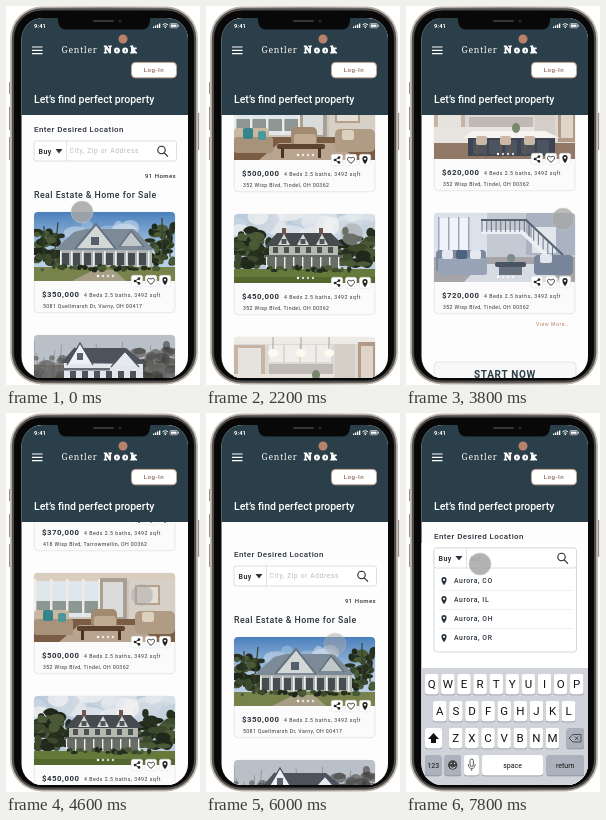
Animation, 194 px wide and 379 px high, one loop 8 s. Source, as an HTML page:

```html
<!DOCTYPE html>
<html lang="en">
<head>
<meta charset="utf-8">
<title>Property search</title>
<style>
  html, body { margin: 0; width: 100%; height: 100%; overflow: hidden; background: #fff; }
  svg { display: block; width: 100vw; height: 100vh; font-family: Roboto, sans-serif; }
</style>
</head>
<body>
<svg id="stage" viewBox="0 0 194 379"></svg>
<script>
const TEAL = '#2a3f49', PEACH = '#b9826b', INK = '#2b333c';
const LOOP = 8000, STEP = 200;

// Drawing helpers
const rect = (x, y, w, h, fill, rx = 0, extra = '') =>
  `<rect x="${x}" y="${y}" width="${w}" height="${h}" rx="${rx}" fill="${fill}" ${extra}/>`;
const shape = (d, fill, extra = '') => `<path d="${d}" fill="${fill}" ${extra}/>`;
const line = (d, color, w = 1, extra = '') =>
  `<path d="${d}" fill="none" stroke="${color}" stroke-width="${w}" ${extra}/>`;
const oval = (x, y, rx, ry, fill, extra = '') =>
  `<ellipse cx="${x}" cy="${y}" rx="${rx}" ry="${ry}" fill="${fill}" ${extra}/>`;
const text = (s, x, y, size, fill = INK, spacing = 0, weight = 400, extra = '') =>
  `<text x="${x}" y="${y}" font-size="${size}" fill="${fill}" letter-spacing="${spacing}" font-weight="${weight}" ${extra}>${s}</text>`;
const at = (x, y, content, id = '') => `<g ${id && `id="${id}"`} transform="translate(${x} ${y})">${content}</g>`;
const many = (n, fn) => Array.from({ length: n }, (_, i) => fn(i)).join('');

function randomizer(seed) {
  return () => (seed = (seed * 16807) % 2147483647) / 2147483647;
}

function blobs(seed, n, x, y, w, h, size, colors, opacity = 1) {
  const rnd = randomizer(seed * 7919);
  return many(n, i => oval((x + rnd() * w).toFixed(1), (y + rnd() * h).toFixed(1),
    (size * (.6 + rnd())).toFixed(1), (size * (.5 + rnd() * .6)).toFixed(1),
    colors[i % colors.length], `opacity="${opacity}"`));
}

const panes = (x, y, n, gap, w, h, fill) => many(n, i => rect(x + i * gap, y, w, h, fill));
const leaves = ['#26301f', '#3b4a2c', '#1f281b', '#4a5936'];

// Photos, each 141 x 69
const photos = [
  () => rect(0, 0, 141, 69, 'url(#sky)') +
    blobs(11, 8, 30, 14, 80, 12, 8, ['#d8e4ef', '#a9c7e5'], .5) +
    blobs(5, 45, 0, 20, 28, 32, 4, leaves) +
    blobs(8, 45, 112, 14, 28, 38, 4, leaves) +
    line('M10 50V14M20 50L24 10M128 45V6M136 45V14', '#37402b', 1.2) +
    rect(26, 36, 92, 20, '#aeb3b2') + panes(28, 41, 8, 11, 7, 12, '#444d50') +
    shape('M20 38L40 20L52 17H100L120 38Z', '#7d8b98') +
    shape('M42 36L62 13L80 36Z', '#d3d7d6') + line('M41 37L62 12L82 37', '#66727d', 2) +
    shape('M86 34L97 20L109 34Z', '#c2c8ca') + line('M85 35L97 19L110 35', '#66727d', 1.5) +
    rect(57, 25, 8, 8, '#53606a') + panes(26, 39, 9, 11, 1.5, 17, '#eceeec') +
    rect(0, 55, 141, 14, '#77834a') + shape('M38 69L60 58H80L92 69Z', '#a69f86') +
    blobs(21, 36, 5, 54, 130, 4, 2.6, leaves),

  () => rect(0, 0, 141, 69, '#b9c0c8') + rect(0, 30, 141, 22, '#6f7071') +
    blobs(9, 40, 100, 10, 41, 36, 5, ['#4d4b48', '#65625e', '#3b3c3a'], .6) +
    blobs(3, 24, 0, 22, 30, 22, 4, ['#6c6a68', '#54544f'], .6) +
    many(24, i => line(`M${i * 6} 48L${i * 6 + Math.sin(i * 5) * 4} ${6 + 16 * Math.abs(Math.sin(i * 2.3))}`, '#55524f', .6, 'opacity=".6"')) +
    rect(30, 27, 79, 24, '#e3e6eb') +
    shape('M27 28L40 13H92L112 29Z', '#4c535d') +
    shape('M34 29L46 9L58 29Z', '#eef0f4') + line('M33 30L46 8L59 30', '#4d555f', 1.3) +
    shape('M78 31L91 17L104 31Z', '#e6e9ee') + line('M77 32L91 16L105 32', '#4d555f', 1.3) +
    panes(36, 36, 6, 12, 6, 10, '#4c535c') + rect(43, 18, 6, 7, '#59636e') +
    rect(28, 33, 48, 2.5, '#646c76') +
    rect(0, 49, 141, 20, '#e6eaf0') + shape('M30 69Q60 54 112 56L141 64V69Z', '#b3bac4') +
    blobs(4, 12, 25, 49, 88, 2, 2, ['#3f413f', '#65655f'], .8),

  () => rect(0, 0, 141, 69, '#cfc6bb') + rect(0, 0, 141, 8, '#d8cdbf') +
    rect(2, 8, 62, 36, '#dfe7ec') + rect(2, 28, 62, 12, '#8c9692') +
    panes(0, 6, 5, 16, 2.4, 38, '#efebe5') +
    rect(66, 5, 27, 42, '#a9a093') + rect(69, 9, 20, 35, '#d9dcda') +
    rect(95, 6, 46, 40, '#d7d0c7') + rect(101, 12, 25, 20, '#b6a08b') + rect(103, 14, 21, 16, '#e4ded4') +
    rect(0, 46, 141, 23, '#7b5c45') + shape('M25 69L45 52H103L123 69Z', '#b9a58f') +
    rect(0, 37, 35, 18, '#c9b79f', 4) + rect(0, 46, 39, 16, '#a8937a', 3) +
    rect(9, 37, 10, 11, '#35858c', 2) + rect(24, 40, 8, 9, '#4b979b', 2) +
    rect(57, 36, 26, 19, '#a28a71', 5) + rect(60, 43, 22, 11, '#c0ab92', 3) +
    rect(101, 38, 40, 23, '#b09b84', 5) + rect(108, 39, 12, 10, '#dcd0bf', 2) +
    rect(43, 53, 48, 5, '#5c4231', 2) + panes(47, 57, 2, 37, 3, 10, '#4b3426'),

  () => rect(0, 0, 141, 69, '#b9cbdd') +
    blobs(31, 30, 0, 0, 141, 20, 10, ['#e5e9ec', '#cbd6e0', '#f0f1f0'], .75) +
    blobs(17, 70, 0, 27, 141, 22, 5, leaves) +
    blobs(41, 40, 0, 16, 26, 36, 5, leaves) + blobs(43, 40, 108, 17, 33, 34, 5, leaves) +
    rect(35, 29, 69, 27, '#b7b9b1') + shape('M31 32L43 19H97L110 32Z', '#454b4e') +
    rect(48, 14, 4, 7, '#6f5750') + rect(85, 14, 4, 7, '#6f5750') +
    many(3, i => at(45 + i * 19, 21, shape('M-1 10L5 -1L11 10Z', '#d9dad5') + rect(2.5, 4, 5, 5, '#4d5758'))) +
    panes(39, 33, 6, 11, 5, 6, '#4a5351') + rect(30, 41, 79, 3, '#626866') +
    rect(34, 44, 71, 11, '#686e66') + panes(32, 43, 9, 9, 1.4, 13, '#eeeee8') +
    rect(0, 55, 141, 14, '#65793a') + rect(0, 63, 141, 6, '#53672f') +
    blobs(2, 28, 23, 53, 95, 4, 2.5, leaves),

  () => rect(0, 0, 141, 69, '#dcd8d4') + rect(0, 0, 141, 7, '#eeeae5') +
    rect(0, 8, 31, 30, '#c6b5a5') + rect(4, 11, 23, 26, '#e6e3df') +
    panes(35, 8, 4, 16, 14, 17, '#f0eeeb') + rect(35, 27, 64, 10, '#bfbab5') +
    rect(101, 7, 20, 42, '#d5cec6') + rect(124, 5, 17, 47, '#b29a86') + rect(127, 9, 12, 39, '#dfd4c9') +
    many(3, i => line(`M${39 + i * 28} 0V13`, '#8a8580', .7) + oval(39 + i * 28, 16, 5, 4, '#fffaf0')) +
    rect(0, 37, 100, 16, '#e7e4e0') +
    rect(0, 53, 141, 16, '#927867') + shape('M38 41H111L126 48H29Z', '#f6f4f1') +
    rect(34, 48, 87, 18, '#3d4553') + panes(39, 50, 5, 16, 12, 14, '#4d5461') +
    many(3, i => at(42 + i * 24, 46, rect(0, 0, 11, 9, '#cbb9a6', 2) + line('M1 9V21M10 9V21', '#705442', 1.3))) +
    oval(82, 38, 4, 5, '#78866b'),

  () => rect(0, 0, 141, 69, '#c4cad4') + rect(0, 0, 53, 44, '#dce2eb') +
    rect(5, 5, 30, 32, '#eff4fa') + panes(4, 4, 4, 10, 1.5, 34, '#9ca8b9') +
    rect(92, 0, 49, 42, '#aab3c1') + rect(98, 14, 24, 26, '#e1e6ec') +
    line('M47 7H92L129 42', '#5b6473', 2.2) + line('M47 19H88L121 50', '#eceff4', 4) +
    many(16, i => line(`M${48 + i * 4.7} ${7 + Math.max(0, i - 9) * 4.4}v12`, '#515c6d', .8)) +
    rect(0, 44, 141, 25, '#a8a5a9') + shape('M30 69L47 51H110L127 69Z', '#d7dbe3') +
    rect(2, 37, 50, 22, '#7c899e', 4) + rect(4, 45, 49, 17, '#98a4b6', 3) +
    many(3, i => rect(8 + i * 14, 37, 11, 9, i % 2 ? '#4e6381' : '#e5e9ef', 2)) +
    rect(100, 42, 39, 20, '#78859a', 4) + rect(106, 41, 12, 9, '#e1e6ec', 2) +
    rect(61, 49, 31, 5, '#495463', 2) + rect(65, 54, 23, 8, '#68717e') + oval(77, 45, 4, 4, '#7d8f86')
];

const pin = (color, hole) =>
  shape('M0 4.2C-4 -.5 -2.8 -4 0 -4S4 -.5 0 4.2Z', color) + oval(0, -1.2, 1.1, 1.1, hole);
const icons = [
  line('M2 -2.4L-2 0L2 2.4', '#222', .9) + oval(2, -2.4, 1.3, 1.3, '#222') + oval(-2, 0, 1.3, 1.3, '#222') + oval(2, 2.4, 1.3, 1.3, '#222'),
  line('M0 3.3C-6 -.5 -3 -4.6 0 -1.8C3 -4.6 6 -.5 0 3.3Z', '#222', .9),
  pin('#222', '#fff')
];

const homes = [
  ['$350,000', '5081 Quellmarsh Dr, Varny, OH 00417'],
  ['$370,000', '418 Wisp Blvd, Tarrowmellin, OH 00362'],
  ['$500,000', '352 Wisp Blvd, Tindel, OH 00362'],
  ['$450,000', '352 Wisp Blvd, Tindel, OH 00362'],
  ['$620,000', '352 Wisp Blvd, Tindel, OH 00362'],
  ['$720,000', '352 Wisp Blvd, Tindel, OH 00362']
];

const card = ([price, address], i) => at(28, 206 + i * 123,
  rect(.2, .2, 140.8, 100.6, '#fbfbfb', 4, 'stroke="#dedfe1" stroke-width=".7"') +
  `<g clip-path="url(#photo)">${photos[i]()}</g>` +
  many(4, k => oval(64 + k * 5, 64, 1.2, 1.2, '#fff', `opacity="${k ? .75 : 1}"`)) +
  icons.map((icon, k) => at(103 + k * 14, 69,
    rect(-5.7, -5.7, 11.4, 11.4, '#fff', 2, 'stroke="#ddd" stroke-width=".5"') + icon)).join('') +
  text(price, 8, 85, 7.8, INK, .55, 700) +
  text('4 Beds 2.5 baths, 3492 sqft', 50, 85, 5.2, '#333', .52) +
  text(address, 9, 96, 5.2, '#333', .38));

const searchBar = query =>
  rect(28, 135, 142.5, 20, '#fff', 2.5, 'stroke="#d5d6d9" stroke-width=".8"') +
  text('Buy', 32.5, 147.5, 7, INK, .45, 700) + shape('M49.5 143H56.5L53 147.5Z', INK) +
  line('M60.5 135V155', '#d5d6d9', .7) + query +
  '<circle cx="155.5" cy="144" r="3.7" fill="none" stroke="#222" stroke-width="1.1"/>' +
  line('M158.2 146.8L162 150.6', '#222', 1.2);

const page = text('Enter Desired Location', 28, 126, 8, INK, .4, 500) +
  searchBar(text('City, Zip or Address', 63.5, 147, 6.6, '#b9bbc0', .65)) +
  text('91 Homes', 139, 172, 6, INK, .45, 500) +
  text('Real Estate &amp; Home for Sale', 28, 192, 8.8, INK, .45, 500) +
  homes.map(card).join('') +
  text('View More...', 130, 934, 5.2, PEACH, .5) +
  rect(28, 970, 142, 50, '#f8f8f9', 4, 'stroke="#d9dadd" stroke-width=".7"') +
  text('START NOW', 68, 986, 10, TEAL, .7, 700);

const dropdown = rect(15, 130, 167, 242, '#fff') +
  rect(28, 135, 142.5, 104, '#fff', 3, 'stroke="#d3d4d8" stroke-width=".9"') +
  searchBar('<text id="query" x="63.5" y="147.5" font-size="6.8" letter-spacing=".6" fill="#888"></text>') +
  ['CO', 'IL', 'OH', 'OR'].map((state, i) => at(0, i * 19,
    at(38, 168, pin(INK, '#fff')) + text('Aurora, ' + state, 48, 170, 6.8, INK, .6, 500) +
    (i < 3 ? line('M32 177.5H167', '#e6e6e8', .6) : ''))).join('');

const GREY = '#acb2bd';
const key = (x, y, w, label = '', fill = '#fff', size = 11.5) =>
  rect(x, y + .8, w, 20.5, '#898d93', 2.4) + rect(x, y, w, 20.5, fill, 2.4) +
  text(label, x + w / 2, y + 10.2 + size * .36, size, '#111', 0, 400, 'text-anchor="middle"');
const keyRow = (letters, x, y) => [...letters].map((c, i) => key(x + i * 16.1, y, 13.6, c)).join('');
const keyboard = rect(15, 255, 167, 120, '#d0d3da') +
  keyRow('QWERTYUIOP', 19, 261) + keyRow('ASDFGHJKL', 27, 288) + keyRow('ZXCVBNM', 43, 315) +
  key(19, 315, 17) + shape('M27.5 320L33 326H30V330H25V326H22Z', '#111') +
  key(160.5, 315, 17.5, '', GREY) +
  line('M163 325L167 321.5H175V329H167ZM169 323.5L172.5 327M172.5 323.5L169 327', '#333', .8) +
  key(19, 342, 16.5, '123', GREY, 7) + key(38.5, 342, 16.5, '', GREY) +
  oval(46.7, 352, 4.7, 4.7, '#444') + line('M44 353.5Q46.7 357 49.5 353.5M45 349.8V351M48.5 349.8V351', '#fff', .9) +
  key(58, 342, 15) + rect(64, 346, 3.4, 7.5, 'none', 1.7, 'stroke="#444" stroke-width=".9"') +
  line('M62.3 351Q62.3 355.5 65.7 355.5T69.1 351M65.7 355.5V358', '#444', .8) +
  key(76, 342, 61, 'space', '#fff', 7) + key(140.5, 342, 37.5, 'return', GREY, 7);

const serif = 'font-family="Noto Serif, serif"';
const header = rect(12, 10, 174, 99, TEAL) +
  text('9:41', 28, 22, 5.8, '#fff', .1, 700) +
  many(4, i => rect(147 + i * 2, 20.5 - i, 1.3, 1.5 + i, '#fff')) +
  line('M156.5 18.8Q159.3 16.4 162 18.8M157.6 20.4Q159.3 19 160.9 20.4', '#fff', .9) + oval(159.3, 21.5, .7, .7, '#fff') +
  rect(164, 17.5, 7.6, 4.3, 'none', 1, 'stroke="#fff" stroke-width=".6"') + rect(165, 18.5, 5.6, 2.3, '#fff') + rect(172.2, 18.8, .7, 1.8, '#fff') +
  line('M26 41H36.5M26 44.3H36.5M26 47.6H36.5', '#fff', 1.2) +
  text('Gentler', 55.5, 46.5, 8.6, '#f4f2ef', .8, 400, serif) +
  text('Nook', 98, 46.5, 9.6, '#fff', 2.4, 900, serif + ' stroke="#fff" stroke-width=".9"') +
  oval(117, 33, 4.5, 4.5, PEACH) +
  rect(125.5, 56.4, 45, 15.4, '#fff', 4, 'stroke="#c6a291" stroke-width="1"') +
  text('Log-In', 137.7, 66.3, 6.2, '#8d695b', .5, 500) +
  text('Let’s find perfect property', 28, 96.5, 10.5, '#fff', 0, 500);

document.getElementById('stage').innerHTML = `
  <defs>
    <linearGradient id="sky" x2="0" y2="1"><stop stop-color="#4a80bd"/><stop offset=".6" stop-color="#b9cfe5"/></linearGradient>
    <linearGradient id="rim"><stop stop-color="#c9c0b6"/><stop offset=".5" stop-color="#9b938b"/><stop offset="1" stop-color="#c9c0b6"/></linearGradient>
    <clipPath id="screen"><rect x="15.5" y="12" width="166.5" height="360" rx="21"/></clipPath>
    <clipPath id="photo"><path d="M0 69V4Q0 0 4 0H137Q141 0 141 4V69Z"/></clipPath>
  </defs>` +
  rect(0, 0, 194, 379, '#fff') +
  rect(3, 76, 2, 12, '#988f86') + rect(3, 101, 2, 23, '#988f86') + rect(3, 131, 2, 23, '#988f86') +
  rect(191.2, 107, 2, 37, '#988f86') +
  rect(4, .5, 188, 378, 'url(#rim)', 32) + rect(5.8, 2.2, 184.4, 374.6, '#4f4d4c', 30.2) +
  rect(8, 4.4, 180, 370.2, '#080808', 28) +
  `<g clip-path="url(#screen)">${rect(15, 12, 168, 360, '#fdfdfd')}` +
  at(0, 0, page, 'page') + at(0, 0, dropdown, 'dropdown') + at(0, 0, keyboard, 'keyboard') + header + '</g>' +
  shape('M49 11Q52 11 52 14Q52 23.5 61 23.5H135Q144 23.5 144 14Q144 11 147 11Z', '#080808') +
  rect(87, 14, 21, 2, '#33363a', 1) + oval(114, 15, 1.6, 1.6, '#1c2a3c') +
  '<circle id="touch" r="11" fill="#a6a6a6" stroke="#c4c4c4" stroke-width=".7"/>';

// Motion tables: [time, values...]
const scrollSteps = [[0, 0], [800, 0], [1400, 101], [1600, 215], [1800, 305], [2200, 367], [2600, 374],
  [3000, 500], [3400, 600], [3800, 614], [4000, 590], [4200, 500], [4600, 292], [5000, 190],
  [5400, 60], [5800, -14], [6000, -18], [6400, 0]];
const touchSteps = [[0, 76, 206, .85], [400, 95, 250, .85], [800, 112, 278, .85], [1400, 116, 177, .85],
  [1600, 122, 140, .6], [2200, 146, 228, .55], [2600, 150, 295, .8], [3200, 157, 150, .7],
  [3800, 157, 213, .75], [4000, 148, 150, .7], [4600, 136, 182, .5], [5000, 130, 140, .6],
  [6000, 129, 231, .5], [6600, 100, 185, .6], [7200, 74, 147, .85], [7800, 74, 151, .85]];

function sample(steps, t) {
  const next = steps.findIndex(s => s[0] > t);
  if (next < 0) return steps[steps.length - 1].slice(1);
  const a = steps[next - 1], b = steps[next], p = (t - a[0]) / (b[0] - a[0]);
  return a.slice(1).map((v, i) => v + (b[i + 1] - v) * p);
}

const $ = id => document.getElementById(id);

function render(t) {
  const [scroll] = sample(scrollSteps, t);
  const [x, y, alpha] = sample(touchSteps, t);
  $('page').setAttribute('transform', `translate(0 ${-scroll})`);
  $('touch').setAttribute('transform', `translate(${x} ${y})`);
  $('touch').setAttribute('opacity', alpha);
  $('dropdown').style.display = t >= 7600 ? '' : 'none';
  $('keyboard').style.display = t >= 7400 ? '' : 'none';
  $('keyboard').setAttribute('transform', `translate(0 ${t < 7600 ? 50 : 0})`);
  $('query').textContent = t >= 7800 ? 'Aur' : 'A';
}

let start;
function tick() {
  const now = performance.now();
  start ??= now;
  render(Math.floor(((now - start) % LOOP) / STEP) * STEP);
  requestAnimationFrame(tick);
}
tick();
</script>
</body>
</html>
```
